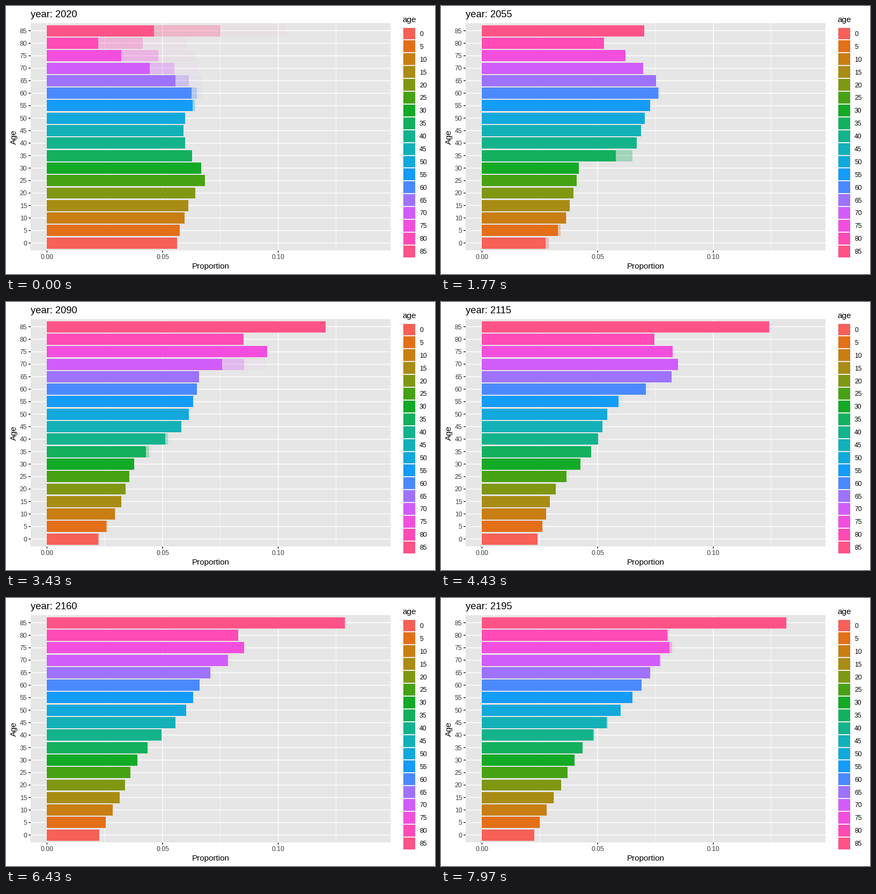
Animation of 800x500 px, one loop 8 s. Source, as a matplotlib script:

```python
import numpy as np
import matplotlib.pyplot as plt
from matplotlib.animation import FuncAnimation
from matplotlib.patches import Rectangle

plt.rcParams["font.family"] = "Liberation Sans"

DPI, W, H = 100, 800, 500
TICK_MS, LOOP_MS, RATE = 20, 8000, 30
FIRST_YEAR, STEPS = 2020, 36
MOVE = 3                                        # poses per transition
WAKE = [(2, (1 / 3) ** 3), (1, (2 / 3) ** 3)]   # (lag, alpha), cubic falloff

# Geometry in pixels
LEFT, RIGHT, BOTTOM = 46, 717, 456.14
PITCH = 396 / 17
TOP, BAR_H = BOTTOM - 18.2 * PITCH, 0.9 * PITCH
ZERO, UNIT = 76.4, 4313
KEY_X, KEY_Y, KEY = 740, 39.55, 23.9

AGES = np.arange(0, 90, 5)
GRID, TICK, TICK_TEXT = "white", "#262626", "#3c3c3c"


def hue_color(hue):
    """Polar LUV colour (chroma 100, luminance 65), darkened by a gamma."""
    u = 100 * np.cos(np.radians(hue)) / 845 + 0.1978
    v = 100 * np.sin(np.radians(hue)) / 845 + 0.4683
    y = (81 / 116) ** 3
    xyz = y * np.array([9 * u, 4 * v, 12 - 3 * u - 20 * v]) / (4 * v)
    to_rgb = np.array([[3.2406, -1.5372, -0.4986],
                       [-0.9689, 1.8758, 0.0415],
                       [0.0557, -0.2040, 1.0570]])
    lin = np.clip(to_rgb @ xyz, 0.0031, 1)
    srgb = 1.055 * lin ** (1 / 2.4) - 0.055
    return tuple(np.clip(srgb, 0.13, 1) ** 1.27)


COLORS = [hue_color(15 + 20 * i) for i in range(18)]


def eased(x, points):
    """Curve through (x, y) points with a cosine ease between neighbours."""
    px, py = np.array(points, float).T
    k = np.clip(np.searchsorted(px, x, side="right") - 1, 0, len(px) - 2)
    t = (x - px[k]) / (px[k + 1] - px[k])
    return py[k] + (py[k + 1] - py[k]) * (1 - np.cos(np.pi * t)) / 2


def project():
    """Age shares at every step: ageing by mortality, births by fertility."""
    pop = eased(AGES, [(0, 243), (16, 264), (25, 295), (43, 255),
                       (49, 257), (57, 275), (86, 76)])
    pop[-1] = 200
    risk = 0.0015 * np.exp(0.055 * AGES) + 0.183 * np.exp(0.187 * (AGES - 80))
    survive = np.exp(-np.diff(risk))
    survive[-1] = 0.582
    stay_oldest = 0.56
    fertility = 0.229 * np.exp(-((AGES - 27.6) / 4.69) ** 2 / 2)
    states = [pop / pop.sum()]
    for _ in range(STEPS):
        aged = pop[:-1] * survive
        aged[-1] += stay_oldest * pop[-1]
        pop = np.append(fertility @ pop, aged)
        states.append(pop / pop.sum())
    return np.array(states)


STATES = project()
INDEX = np.arange(STEPS + 1)
ARRIVE = np.maximum(0, np.minimum(7 * INDEX - 1, 6 * INDEX + 24))


def state_at(pose):
    return int(np.searchsorted(ARRIVE, pose, side="right")) - 1


def shares(pose):
    """Bar lengths; before zero the last state returns to the first."""
    if pose < 0:
        a, b, arrive = STATES[-1], STATES[0], 0
    else:
        i = state_at(pose)
        a, b, arrive = STATES[i], STATES[i + 1], ARRIVE[i + 1]
    return a + (b - a) * np.clip((pose - arrive + MOVE) / MOVE, 0, 1)


fig = plt.figure(figsize=(W / DPI, H / DPI), dpi=DPI, facecolor="white")
ax = fig.add_axes([0, 0, 1, 1])
ax.set_xlim(0, W)
ax.set_ylim(H, 0)
ax.axis("off")


def rect(x, y, w, h, color, alpha=1, z=1):
    return ax.add_patch(Rectangle((x, y), w, h, facecolor=color, linewidth=0,
                                  alpha=alpha, zorder=z, snap=True))


def lines(draw, at, start, end, width, color):
    draw(at, start, end, colors=color, linewidth=width * 72 / DPI,
         zorder=2, snap=False)


def label(x, y, s, size, color="black", ha="left", **kw):
    return ax.text(x, y, s, fontsize=size, color=color, ha=ha,
                   va="baseline", **kw)


rows = BOTTOM - (np.arange(18) + 0.6) * PITCH
major = ZERO + UNIT * np.array([0, 0.05, 0.1])
minor = ZERO + UNIT * np.array([0.025, 0.075, 0.125])

rect(LEFT, TOP, RIGHT - LEFT, BOTTOM - TOP, "#e6e6e6", z=0)
lines(ax.vlines, minor, TOP, BOTTOM, 0.74, GRID)
lines(ax.hlines, rows, LEFT, RIGHT, 1.48, GRID)
lines(ax.vlines, major, TOP, BOTTOM, 1.48, GRID)
lines(ax.hlines, rows, LEFT - 3.8, LEFT, 1.48, TICK)
lines(ax.vlines, major, BOTTOM, BOTTOM + 3.8, 1.48, TICK)

for n, x in enumerate(major):
    label(x, 472, f"{n * 0.05:.2f}", 8.8, TICK_TEXT, "center")
label((LEFT + RIGHT) / 2, 490, "Proportion", 11, ha="center")
label(18.5, (TOP + BOTTOM) / 2, "Age", 11, ha="center",
      rotation=90, rotation_mode="anchor")
title = label(46, 20.9, "", 13.2)

label(739.5, 30, "age", 11)
rect(KEY_X, KEY_Y, 24, 18 * KEY, "#efefef")
for i, age in enumerate(AGES):
    y = KEY_Y + i * KEY
    rect(KEY_X + 1, y + 1, 22, KEY - 2, COLORS[i])
    label(771, y + KEY / 2 + 4.4, str(age), 8.8)
    label(39.4, rows[i] + 4.4, str(age), 8.8, TICK_TEXT, "right")


def bar_set(alpha, z):
    return [rect(ZERO, y - BAR_H / 2, 0, BAR_H, c, alpha, z)
            for y, c in zip(rows, COLORS)]


ghosts = [(lag, bar_set(alpha, 3 + n)) for n, (lag, alpha) in enumerate(WAKE)]
solid = bar_set(1, 6)


def update(frame):
    # poses start on whole hundredths of a second
    pose = int((TICK_MS * (frame + 0.5) + 5) * RATE / 1000)
    title.set_text(f"year: {FIRST_YEAR + 5 * state_at(pose)}")
    now = shares(pose)
    for bar, share in zip(solid, now):
        bar.set_width(share * UNIT)
    for lag, bars in ghosts:
        for bar, share, front in zip(bars, shares(pose - lag), now):
            bar.set_width(share * UNIT)
            bar.set_visible(share > front)
    return [title]


anim = FuncAnimation(fig, update, frames=LOOP_MS // TICK_MS, interval=TICK_MS,
                     repeat=True, repeat_delay=0, blit=False)
plt.show()
```
